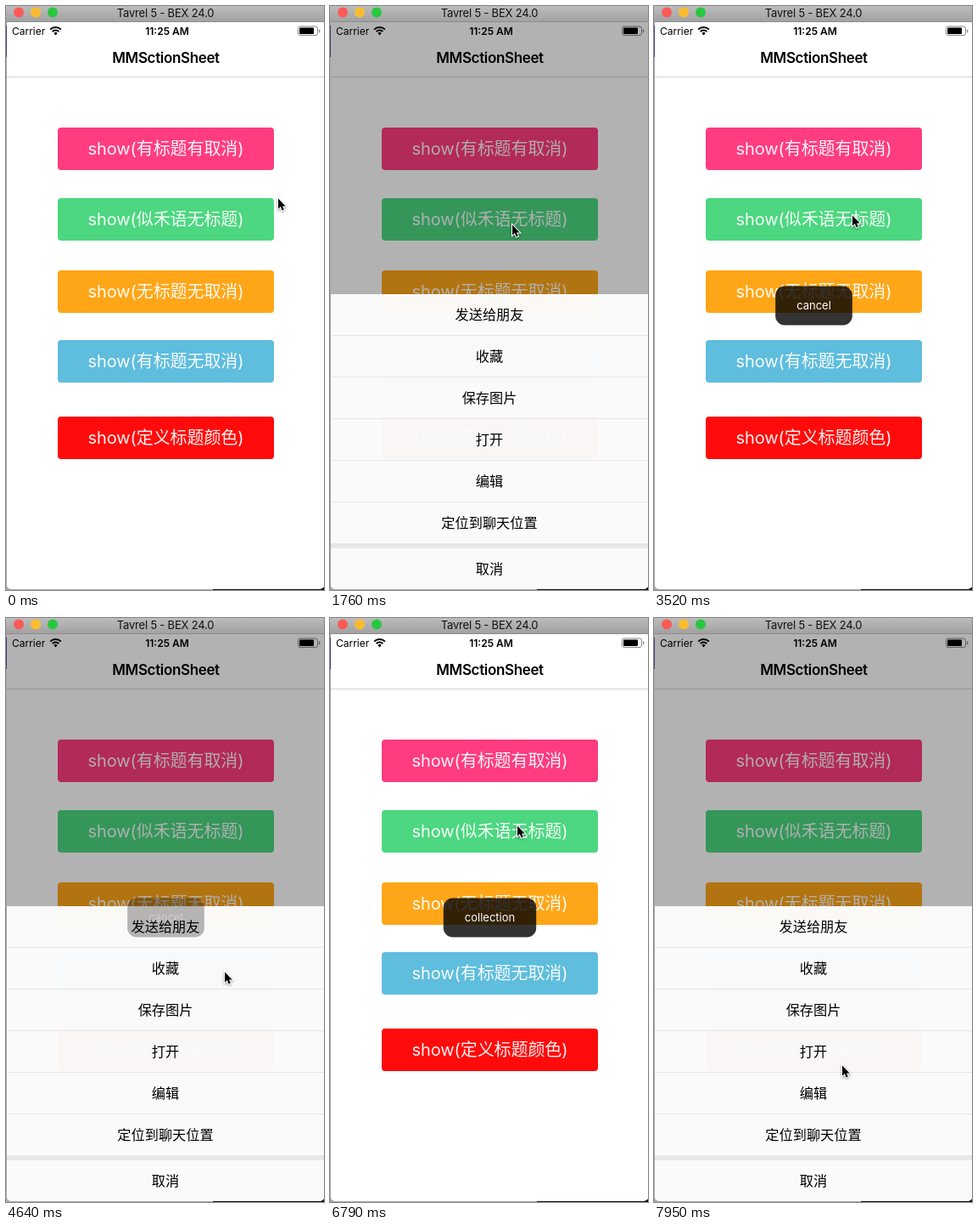
An HTML page with a canvas that plays this animation: 375x687 px, repeating every 8 s.

```html
<!DOCTYPE html>
<html lang="zh-CN">
<head>
<meta charset="utf-8">
<style>
html, body { margin: 0; width: 100%; height: 100%; overflow: hidden; background: #fff; }
canvas { display: block; width: 375px; height: 687px; }
</style>
</head>
<body>
<canvas></canvas>
<script>
const W = 375, H = 687, LOOP = 8000;
const canvas = document.querySelector('canvas');
const ratio = window.devicePixelRatio || 1;
canvas.width = W * ratio;
canvas.height = H * ratio;
const c = canvas.getContext('2d');
c.scale(ratio, ratio);

const BUTTONS = [
  [143, '#ff3c7f', '有标题有取消'],
  [226, '#4cd780', '似禾语无标题'],
  [311, '#ffa618', '无标题无取消'],
  [393, '#5fbddd', '有标题无取消'],
  [483, '#ff0b0b', '定义标题颜色'],
];
const ROWS = ['发送给朋友', '收藏', '保存图片', '打开', '编辑', '定位到聊天位置'];
const SHEET_TOP = 339, SHEET_HEIGHT = 348, ROW = 49;

const PRESSES = [1200, 3850, 7060];
const TOASTS = [[2570, 'cancel'], [5360, 'collection']];
const PRESS_DELAY = 150, DISMISS_DELAY = 140, SLIDE = 380;

// Pointer tip: time, x, y
const PATH = [
  [600, 320, 225], [990, 214, 256], [1910, 214, 256], [2330, 338, 285],
  [3080, 338, 285], [3370, 247, 251], [3520, 233, 245], [4525, 233, 245],
  [4640, 257, 415], [4850, 246, 429], [5310, 193, 419], [5880, 193, 419],
  [6170, 250, 244], [6400, 250, 244], [6790, 220, 243], [7590, 220, 243],
  [7860, 225, 519], [7950, 221, 525],
];

const clamp = v => Math.max(0, Math.min(1, v));
const progress = (t, start, length) => clamp((t - start) / length);
const ease = u => (1 - Math.cos(Math.PI * u)) / 2;
const mix = (a, b, u) => a + (b - a) * u;

function rect(x, y, w, h, color, radius = 0) {
  c.fillStyle = color;
  c.beginPath();
  c.roundRect(x, y, w, h, radius);
  c.fill();
}

function circle(x, y, r, color) {
  c.fillStyle = color;
  c.beginPath();
  c.arc(x, y, r, 0, 7);
  c.fill();
}

function text(str, x, y, size, color = '#000', weight = 400, align = 'center', spacing = 0) {
  c.font = `${weight} ${size}px Inter, "Noto Sans CJK SC", "Noto Sans CJK", sans-serif`;
  c.letterSpacing = spacing + 'px';
  c.textAlign = align;
  c.fillStyle = color;
  c.fillText(str, x, y);
}

function drawFrame() {
  rect(0, 0, W, H, '#a9a9a9');
  rect(0, 23, 1, 37, '#4b4280');
  rect(244, 684, 131, 3, '#111');
  const bar = c.createLinearGradient(0, 0, 0, 19);
  bar.addColorStop(0, '#bcbcbc');
  bar.addColorStop(1, '#a0a0a0');
  rect(0, 0, W, 19, bar);
  rect(0, 18, W, 1, '#8c8c8c');
  ['#fc5b57', '#fdbc2e', '#28c840'].forEach((color, i) => circle(15 + 20 * i, 7.5, 6, color));
  text('Tavrel 5 - BEX 24.0', 188, 13, 13, '#111', 400, 'center', -0.2);
}

function drawStatusBar() {
  text('Carrier', 7, 34, 12, '#000', 400, 'left');
  text('11:25 AM', 190, 33.5, 12, '#000', 600);
  c.strokeStyle = '#000';
  c.lineWidth = 2;
  for (const r of [9, 5.5]) {
    c.beginPath();
    c.arc(58.5, 34, r, -Math.PI * 0.75, -Math.PI * 0.25);
    c.stroke();
  }
  c.fillStyle = '#000';
  c.beginPath();
  c.moveTo(58.5, 34.5);
  c.arc(58.5, 34, 3, -Math.PI * 0.75, -Math.PI * 0.25);
  c.fill();
  c.strokeStyle = '#888';
  c.lineWidth = 1;
  c.beginPath();
  c.roundRect(344.5, 24, 23, 10.5, 2.5);
  c.stroke();
  rect(346, 25.5, 17, 7.5, '#000', 1);
  rect(369, 27.5, 1.3, 4, '#888', 1);
}

function drawPage(t) {
  rect(1, 19, W - 1, 667, '#fff');
  drawStatusBar();
  text('MMSctionSheet', 188.5, 67, 17, '#000', 600, 'center', -0.35);
  rect(1, 83, W - 1, 1, '#d2d2d2');
  const pressed = PRESSES.some(p => t >= p && t < p + PRESS_DELAY + 30);
  BUTTONS.forEach(([y, color, label], i) => {
    rect(61, y, 255, 50, color, 4);
    text(`show(${label})`, 188.5, y + 32, 20, `rgba(255,255,255,${pressed && i === 1 ? 0.4 : 0.95})`, 400, 'center', -0.1);
  });
}

function sheetAmount(t) {
  let amount = 0;
  for (const p of PRESSES) amount += ease(progress(t, p + PRESS_DELAY, SLIDE));
  for (const [start] of TOASTS) amount -= ease(progress(t, start + DISMISS_DELAY, SLIDE));
  return clamp(amount);
}

function drawSheet(amount) {
  if (!amount) return;
  rect(1, 19, W - 1, 667, `rgba(0,0,0,${0.3 * amount})`);
  const top = SHEET_TOP + SHEET_HEIGHT * (1 - amount);
  rect(1, top, W - 1, SHEET_HEIGHT, 'rgba(252,252,252,0.975)');
  ROWS.forEach((label, i) => {
    const y = top + ROW * i;
    text(label, 188, y + 30, 16.2);
    if (i) rect(1, y - 1, W - 1, 1, '#e6e6e6');
  });
  rect(1, top + 293, W - 1, 6, '#e8e8e8');
  text('取消', 188, top + 329, 16.2);
}

function drawToast(t, start, label) {
  const alpha = progress(t, start, 130) - progress(t, start + 1980, 140);
  if (alpha <= 0) return;
  c.globalAlpha = alpha;
  c.font = '400 13px Inter, sans-serif';
  c.letterSpacing = '0px';
  const width = c.measureText(label).width + 50;
  rect(188.5 - width / 2, 329.5, width, 46, 'rgba(0,0,0,0.8)', 11);
  text(label, 188.5, 357, 13, '#fff');
  c.globalAlpha = 1;
}

function drawPointer(t) {
  const next = PATH.findIndex(p => p[0] > t);
  const b = PATH[next < 0 ? PATH.length - 1 : next];
  const a = next > 0 ? PATH[next - 1] : b;
  const u = ease(progress(t, a[0], b[0] - a[0] || 1));
  c.save();
  c.translate(mix(a[1], b[1], u) + 1, mix(a[2], b[2], u) + 1.5);
  const arrow = new Path2D('M0 0V12.2L2.8 9.6L4.7 14L6.8 13.1L5 8.9H8.7Z');
  c.shadowColor = 'rgba(0,0,0,0.4)';
  c.shadowBlur = 3 * ratio;
  c.shadowOffsetY = ratio;
  c.lineWidth = 2;
  c.strokeStyle = '#fff';
  c.stroke(arrow);
  c.shadowColor = 'transparent';
  c.fillStyle = '#000';
  c.fill(arrow);
  c.restore();
}

function draw(now) {
  const t = now % LOOP;
  drawFrame();
  c.save();
  c.beginPath();
  c.roundRect(1, 19, W - 1, 667, [0, 0, 5, 5]);
  c.clip();
  drawPage(t);
  drawSheet(sheetAmount(t));
  TOASTS.forEach(([start, label]) => drawToast(t, start, label));
  c.restore();
  drawPointer(t);
  requestAnimationFrame(draw);
}
requestAnimationFrame(draw);
</script>
</body>
</html>
```
